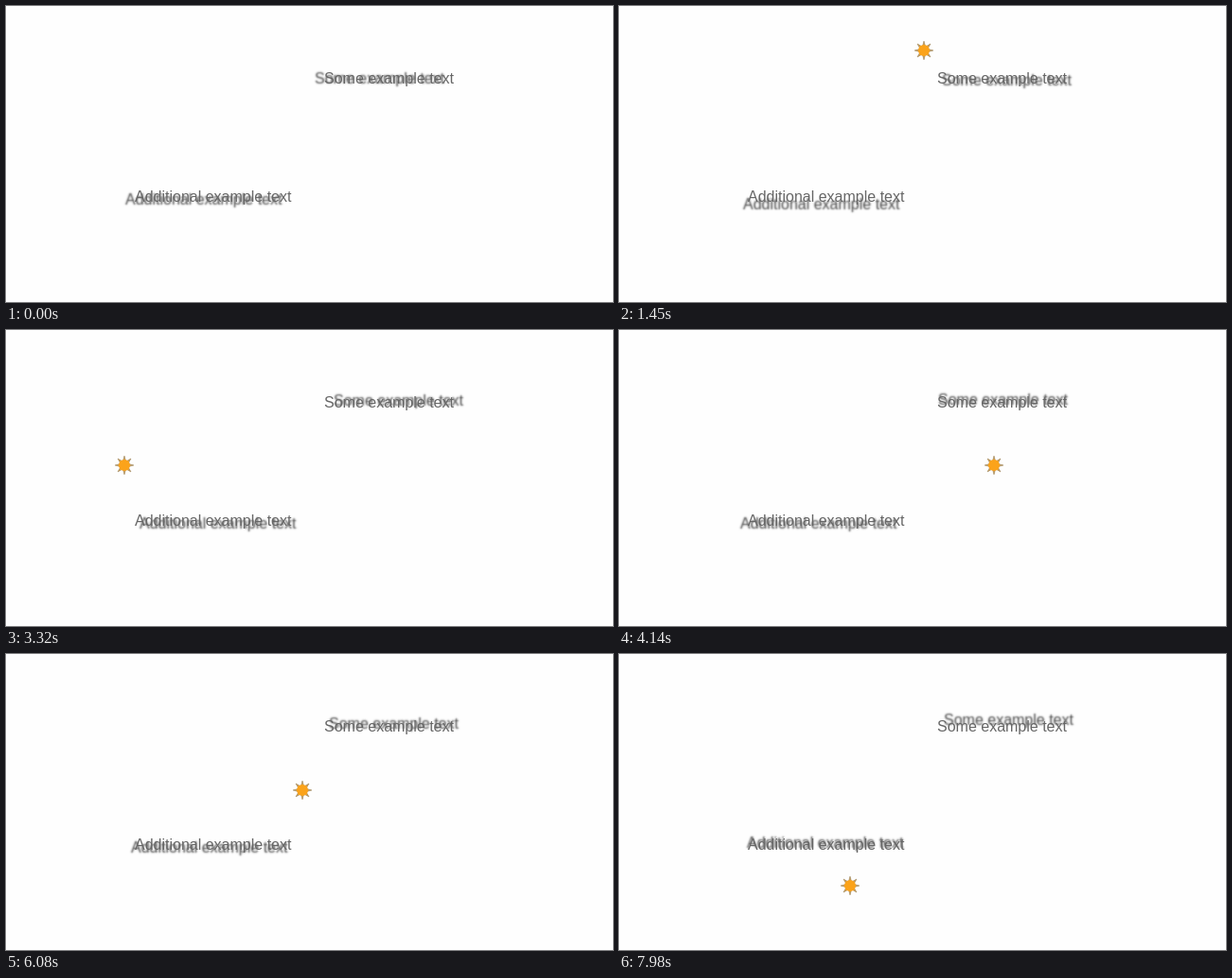
Animation of 641x313 px, one loop 8000 ms. Source, as an HTML page with a canvas:

```html
<!DOCTYPE html>
<html lang="en">
<head>
<meta charset="utf-8">
<title>Light and shadow</title>
<style>
  html, body { margin: 0; width: 100%; height: 100%; overflow: hidden; background: #fefefe; }
  canvas { display: block; }
</style>
</head>
<body>
<canvas width="641" height="313"></canvas>
<script>
const canvas = document.querySelector('canvas');
const ctx = canvas.getContext('2d');
const LOOP = 8000, STEP = 92.8, LAST_STEP = 86;
const STEPS_PER_POINT = 5, LEAD_STEPS = 3;

// Key points of the light's path, evenly spaced in time
const path = [
  [760, 100], [590, 56], [490, 39], [400, 30], [313, 60],     // in from the right
  [350, 182], [239, 285], [92, 237], [145, 128], [292, 146],  // lower loop
  [450, 131], [472, 50], [423, 72], [365, 112], [302, 151],   // upper loop
  [272, 178], [245, 202], [236, 220], [247, 250], [258, 265]  // down again
];

const labels = [
  { text: 'Some example text', x: 336, y: 82, centerX: 415 },
  { text: 'Additional example text', x: 136, y: 207, centerX: 227 }
];

// Catmull-Rom curve through the key points
function lightAt(step) {
  const position = (step + LEAD_STEPS) / STEPS_PER_POINT;
  const i = Math.floor(position), u = position - i;
  const b = path[i], c = path[i + 1];
  const a = path[i - 1] || b, d = path[i + 2] || c;
  return [0, 1].map(k =>
    b[k] + u / 2 * (c[k] - a[k]
      + u * (2 * a[k] - 5 * b[k] + 4 * c[k] - d[k]
      + u * (3 * (b[k] - c[k]) + d[k] - a[k]))));
}

function drawLabel({ text, x, y, centerX }, [lightX, lightY]) {
  const dx = centerX - lightX, dy = y - lightY;
  const scale = Math.min(1 / 20, 10 / Math.hypot(dx, dy));
  ctx.save();
  ctx.font = '16px "Liberation Sans", Arial, sans-serif';
  ctx.fillStyle = '#666';
  ctx.shadowColor = '#444';
  ctx.shadowBlur = 2;
  ctx.shadowOffsetX = Math.round(dx * scale);
  ctx.shadowOffsetY = Math.round(dy * scale);
  ctx.fillText(text, x, y);
  ctx.restore();
}

function drawSun([x, y]) {
  ctx.save();
  ctx.translate(Math.round(x), Math.round(y));
  ctx.beginPath();
  for (let i = 0; i < 16; i++) {
    const radius = i % 2 ? 4.2 : 9.8, angle = i * Math.PI / 8;
    ctx.lineTo(radius * Math.cos(angle), radius * Math.sin(angle));
  }
  ctx.closePath();
  ctx.fillStyle = '#d9a04a';
  ctx.strokeStyle = '#a08a64';
  ctx.lineWidth = 0.7;
  ctx.fill();
  ctx.stroke();
  ctx.beginPath();
  ctx.arc(0, 0, 6, 0, 2 * Math.PI);
  ctx.fillStyle = '#fba31a';
  ctx.fill();
  ctx.restore();
}

function draw() {
  const time = performance.now() % LOOP;
  const light = lightAt(Math.min(LAST_STEP, Math.floor((time + 50) / STEP)));
  ctx.fillStyle = '#fefefe';
  ctx.fillRect(0, 0, canvas.width, canvas.height);
  labels.forEach(label => drawLabel(label, light));
  drawSun(light);
  requestAnimationFrame(draw);
}
draw();
</script>
</body>
</html>
```
